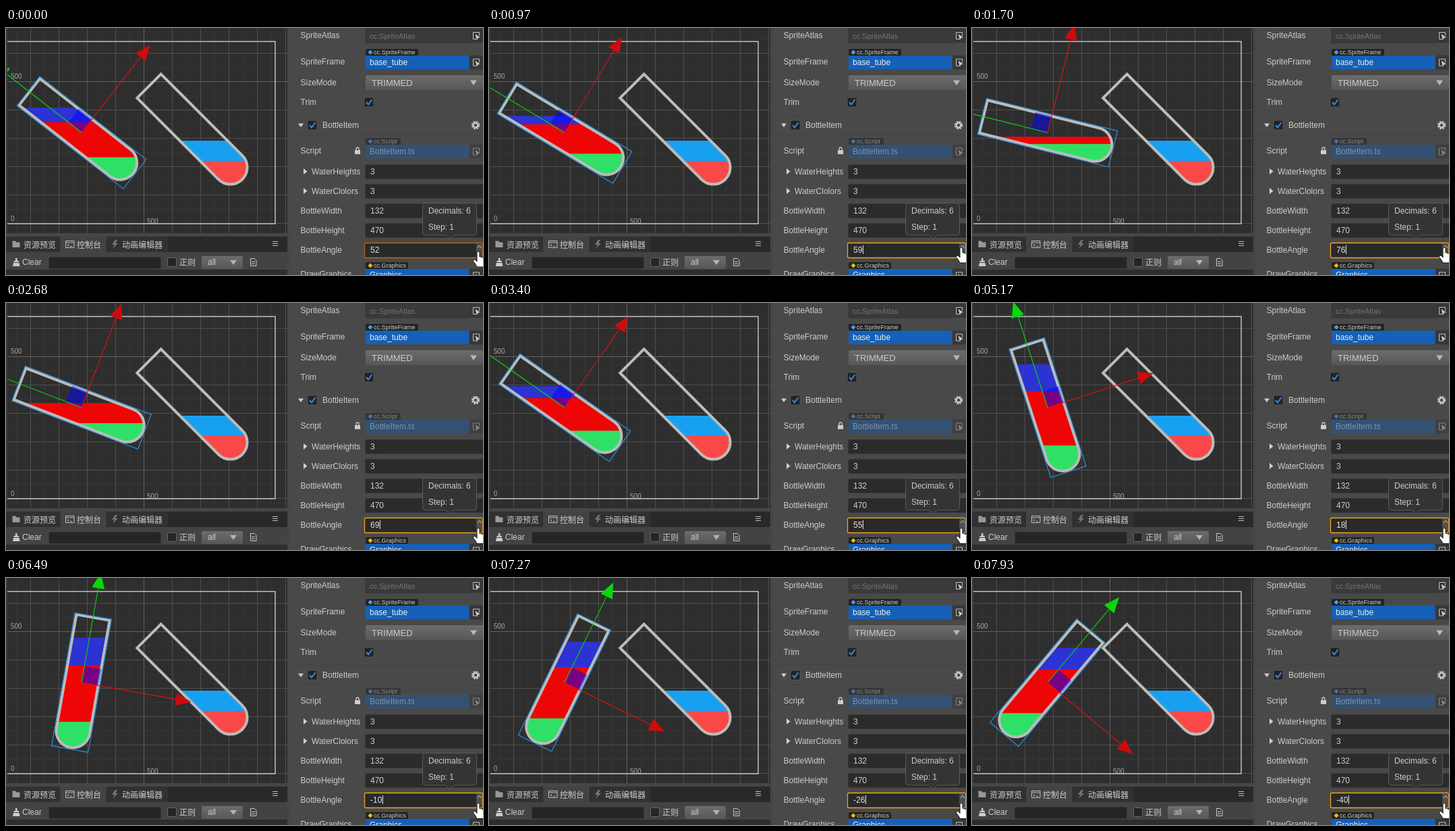
Animation of 707 by 366 pixels, one loop 8 s. Source, as an HTML page:

```html
<!DOCTYPE html>
<html lang="zh">
<head>
<meta charset="utf-8">
<style>
html, body { margin: 0; width: 100%; height: 100%; overflow: hidden; background: #2b2b2b; }
svg { display: block; width: 707px; height: 366px; }
text { font: 12px "Liberation Sans", Arial, "Noto Sans CJK SC", "Noto Sans CJK", sans-serif; fill: #cdcdcd; dominant-baseline: central; }
.cjk { font-family: "Noto Sans CJK SC", "Noto Sans CJK", sans-serif; }
</style>
</head>
<body>
<svg viewBox="0 0 707 366">
  <defs>
    <path id="tube" d="M-25-98H25V72.500A25 25 0 0 1-25 72.500Z"/>
    <clipPath id="inA"><use id="clipA" href="#tube"/></clipPath>
    <clipPath id="inB"><use href="#tube" transform="translate(281.300 155.300) rotate(-45)"/></clipPath>
    <clipPath id="view"><rect x="2" width="415" height="304"/></clipPath>
    <linearGradient id="sel" x2="0" y2="1"><stop stop-color="#6c6c6c"/><stop offset="1" stop-color="#575757"/></linearGradient>
    <g id="pick">
      <rect x="-10" y="-10.500" width="20" height="21" fill="#383838"/>
      <path d="M1 5H-4.500V-5H4.500V0" fill="none" stroke="#c4c4c4"/>
      <path d="M-1.500-2.500L6 2.500L2.800 3L1 6Z" fill="#d0d0d0"/>
    </g>
    <g id="check">
      <rect x="-7" y="-7" width="14" height="14" rx="2" fill="#222" stroke="#5c5c5c" stroke-width=".8"/>
      <path d="M-4 0L-1 3.500L4.500-4" fill="none" stroke="#3d86e8" stroke-width="2"/>
    </g>
  </defs>

  <!-- scene view -->
  <rect width="417" height="304" fill="#2e2e2e"/>
  <g clip-path="url(#view)">
    <path id="minor" stroke="#363636"/>
    <path id="major" stroke="#4f4f4f"/>
    <path d="M0 79.500H417M204.500 0V304" stroke="#626262"/>
    <rect x="-6" y="20" width="405" height="270" fill="none" stroke="#d6d6d6" stroke-width="1.300"/>
    <g opacity=".75">
      <text x="7" y="71" style="font-size:10px">500</text>
      <text x="7" y="282" style="font-size:10px">0</text>
      <text x="209" y="286" style="font-size:10px">500</text>
    </g>
    <g clip-path="url(#inB)">
      <rect x="180" y="167" width="200" height="80" fill="#18a0f0"/>
      <rect x="180" y="197" width="200" height="50" fill="#fa4747"/>
    </g>
    <use href="#tube" transform="translate(281.300 155.300) rotate(-45)" fill="none" stroke="#bcbcb8" stroke-width="4"/>
    <g clip-path="url(#inA)" id="water">
      <rect width="260" height="260" fill="#2d33d2"/>
      <rect width="260" height="260" fill="#ee0606"/>
      <rect width="260" height="260" fill="#2fe066"/>
    </g>
    <g id="bottle">
      <use href="#tube" fill="none" stroke="#bcbcb8" stroke-width="4"/>
      <rect x="-27.500" y="-100" width="55" height="200" fill="none" stroke="#2b8fe0" stroke-width="1.200"/>
      <rect y="-25" width="25" height="25" fill="#00f" fill-opacity=".5"/>
      <path d="M0 0V-142" stroke="#08d808" stroke-width="1.100"/>
      <path d="M-9.500-142L0-165L9.500-142Z" fill="#08d808"/>
      <path d="M0 0H142" stroke="#e01010" stroke-width="1.100"/>
      <path d="M142-9.500L165 0L142 9.500Z" fill="#cc0c0c"/>
    </g>
  </g>
  <path d="M1 0V304" stroke="#4a4a4a"/>

  <!-- bottom panel -->
  <rect y="304" width="421" height="5" fill="#464646"/>
  <rect y="309" width="417" height="23" fill="#292929"/>
  <path d="M0 309H79V332H0ZM150 309H240V332H150Z" fill="#313131"/>
  <rect x="80" y="309" width="69" height="23" fill="#434343"/>
  <rect y="332" width="417" height="26" fill="#434343"/>
  <rect y="358" width="417" height="8" fill="#2e2e2e"/>
  <path d="M9.500 315.500H14L15.500 317.500H20.500V325H9.500Z" fill="#999"/>
  <path d="M88.500 315.500H101V325.500H88.500ZM88.500 318H101M91 320.500L93 322L91 323.500M95 323.500H98" fill="none" stroke="#bdbdbd"/>
  <path d="M162 314L157 321H161L158 327L166 319H162L165 314Z" fill="#777"/>
  <text class="cjk" x="26" y="320.500">资源预览</text>
  <text class="cjk" x="105" y="320.500">控制台</text>
  <text class="cjk" x="172" y="320.500">动画编辑器</text>
  <path d="M395 316.500H403M395 319.500H403M395 322.500H403" stroke="#bdbdbd"/>
  <path d="M14 341H16.500V345H19V347H11.500V345H14ZM11 348H19.500L20.500 353H10Z" fill="#cdcdcd"/>
  <text x="24" y="347">Clear</text>
  <rect x="63.500" y="339.500" width="166" height="17" rx="2" fill="#252525" stroke="#373737"/>
  <rect x="239.500" y="340.500" width="13" height="13" rx="2" fill="#252525" stroke="#666"/>
  <text class="cjk" x="257" y="346.500">正则</text>
  <rect x="290" y="338" width="61" height="19" rx="2" fill="url(#sel)"/>
  <text x="299" y="347">all</text>
  <path d="M332 344H342L337 351Z" fill="#b4b4b4"/>
  <path d="M362.500 341.500H368L371 344.500V352.500H362.500ZM364 346.500H369M364 349.500H369" fill="none" stroke="#c8c8c8"/>

  <!-- inspector -->
  <rect x="417" width="4" height="366" fill="#464646"/>
  <rect x="421" width="286" height="366" fill="#494949"/>
  <path d="M421 128.500H707M421 158.500H707" stroke="#424242"/>
  <g id="rows"></g>
  <rect x="533" y="0" width="153" height="22" fill="#3a3a3a" stroke="#353535"/>
  <text x="539" y="12" style="font-size:11px;fill:#737373">cc.SpriteAtlas</text>
  <use href="#pick" x="697" y="11.500"/>
  <rect x="533" y="41" width="153" height="20" fill="#1560b8"/>
  <text x="539" y="51" style="fill:#eee">base_tube</text>
  <use href="#pick" x="697" y="51"/>
  <rect x="533" y="70" width="174" height="22" rx="2" fill="url(#sel)"/>
  <text x="542" y="81" style="font-size:13px">TRIMMED</text>
  <path d="M688 77.500H698L693 85Z" fill="#b8b8b8"/>
  <use href="#check" x="538" y="110"/>
  <path d="M433 141.500H441L437 147Z" fill="#d0d0d0"/>
  <use href="#check" x="454" y="144"/>
  <circle cx="696" cy="144" r="5" fill="none" stroke="#ccc" stroke-width="2.400" stroke-dasharray="2.600 1.327"/>
  <circle cx="696" cy="144" r="3.300" fill="none" stroke="#ccc" stroke-width="2"/>
  <path d="M517 181H525V187H517Z" fill="#ccc"/>
  <path d="M519 181V179A2 2 0 0 1 523 179V181" fill="none" stroke="#ccc" stroke-width="1.300"/>
  <rect x="533" y="173" width="153" height="20" fill="#335173"/>
  <text x="539" y="183" style="fill:#7f92a8">BottleItem.ts</text>
  <use href="#pick" x="697" y="183" opacity=".5"/>
  <path d="M441 208L446.500 212.500L441 217ZM441 237L446.500 241.500L441 246Z" fill="#d0d0d0"/>
  <rect x="533" y="357" width="153" height="12" fill="#1560b8"/>
  <text x="539" y="366" style="fill:#eee">Graphics</text>
  <use href="#pick" x="697" y="367"/>

  <rect id="field" x="531.500" y="318.500" width="175" height="22" rx="2" fill="#292929" stroke-width="1.300"/>
  <rect x="697" y="319.500" width="9" height="20.500" fill="#505050"/>
  <path d="M699 326L702 322.500L705 326" fill="none" stroke="#ccc"/>
  <text id="value" x="540" y="328.500" style="fill:#e2e2e2"></text>
  <path id="caret" d="M0 322V335" stroke="#eee"/>

  <path d="M621.500 259.500H693.500Q697.500 259.500 697.500 263.500V303Q697.500 307 693.500 307H664L658 313L652 307H621.500Q617.500 307 617.500 303V263.500Q617.500 259.500 621.500 259.500Z" fill="#343434" stroke="#5a5a5a"/>
  <text x="626" y="271">Decimals: 6</text>
  <text x="626" y="295">Step: 1</text>
  <path id="hand" d="M-2 1Q0-1 2 1V8Q4 7 5 9Q7 8 8 10Q10.500 9.500 10.500 12V17Q9.500 20 8.500 23H-2Q-3 20-7.500 14.500Q-8 11.500-5 12L-2 15Z" fill="#fff" stroke="#111"/>
</svg>
<script>
const $ = id => document.getElementById(id);

function grid(id, x0, y0, step) {
  let d = "";
  for (let x = x0; x < 417; x += step) d += `M${x} 0V304`;
  for (let y = y0; y < 304; y += step) d += `M0 ${y}H417`;
  $(id).setAttribute("d", d);
}
grid("minor", 15.5, 16.5, 21);
grid("major", 36.5, 37.5, 42);

const label = (s, x, y) => `<text x="${x}" y="${y}">${s}</text>`;
const tag = (s, y, w, color, opacity) => `<g opacity="${opacity}">
  <rect x="533" y="${y - 5}" width="${w}" height="10" rx="2" fill="#232323"/>
  <path d="M540 ${y - 3.5}l3.500 3.500l-3.500 3.500l-3.500-3.500Z" fill="${color}"/>
  <text x="545" y="${y}" style="font-size:9.100px">${s}</text></g>`;
const input = (s, y) =>
  `<rect x="532.500" y="${y - 10.5}" width="176" height="21" rx="2" fill="#2b2b2b" stroke="#383838"/>` + label(s, 540, y);

$("rows").innerHTML =
  [["SpriteAtlas", 11], ["SpriteFrame", 50], ["SizeMode", 81], ["Trim", 110], ["Script", 182],
   ["BottleWidth", 271], ["BottleHeight", 300], ["BottleAngle", 329], ["DrawGraphics", 365]]
    .map(([s, y]) => label(s, 436.5, y)).join("") +
  label("BottleItem", 469, 144) + label("WaterHeights", 453, 213) + label("WaterClolors", 453, 242) +
  input("3", 213) + input("3", 242) + input("132", 271) + input("470", 300) +
  tag("cc.SpriteFrame", 36, 78, "#4a9cf0", 1) +
  tag("cc.Script", 168, 52, "#4a9cf0", .5) +
  tag("cc.Graphics", 352, 63, "#f0c000", 1);

// Bursts of evenly spaced updates: first, last, count
const bursts = [[120, 1090, 8], [1210, 1830, 6], [2130, 3100, 8], [3250, 4220, 8],
                [4370, 5410, 9], [5530, 6490, 8], [6610, 7510, 8], [7660, 7930, 3]];
// Bottle angle over time: time, degrees
const keys = [[0, 52], [390, 53], [690, 53], [970, 59], [1090, 62], [1830, 79], [2130, 79], [2270, 78],
              [2680, 69], [3100, 61], [4220, 37], [5170, 18], [6490, -10], [7930, -40]];

// Updates fall on a 10 ms clock
function lastUpdate(t) {
  let last = 0;
  for (const [a, b, n] of bursts) {
    for (let i = 0; i < n; i++) {
      const at = Math.floor((a + (b - a) * i / (n - 1)) / 10) * 10;
      if (at > t) return last;
      last = at;
    }
  }
  return last;
}

function angleAt(t) {
  const i = keys.findIndex(k => k[0] >= t);
  if (i === 0) return keys[0][1];
  const [t0, a0] = keys[i - 1], [t1, a1] = keys[i];
  return Math.round(a0 + (a1 - a0) * (t - t0) / (t1 - t0));
}

const CX = 112, CY = 155;
const depths = [-67.5, -25.5, 59];   // surface of each layer along the tube axis
const layers = [...$("water").children];

function draw(t) {
  const angle = angleAt(lastUpdate(t)), rad = angle * Math.PI / 180;
  const cos = Math.cos(rad), sin = Math.abs(Math.sin(rad));
  const pose = `translate(${CX} ${CY}) rotate(${-angle})`;
  $("bottle").setAttribute("transform", pose);
  $("clipA").setAttribute("transform", pose);

  // Water never stands above the lower lip of the mouth
  const lip = 27.5 * sin - 95.5 * cos;
  const sink = Math.max(0, angle - 50) * .1;
  layers.forEach((r, i) => r.setAttribute("y", CY + sink + Math.max(depths[i] * cos, lip)));

  const focused = t >= 120;
  $("value").textContent = angle;
  const end = 541 + $("value").getComputedTextLength();
  $("caret").setAttribute("transform", `translate(${end} 0)`);
  $("caret").style.display = focused ? "" : "none";
  $("field").setAttribute("stroke", focused ? "#f0a41c" : "#b5651d");
  $("hand").setAttribute("transform", `translate(700 ${t < 120 ? 331 : t < 2130 ? 325 : 333.5})`);
}

function tick() {
  draw(performance.now() % 8000);
  requestAnimationFrame(tick);
}
tick();
</script>
</body>
</html>
```
